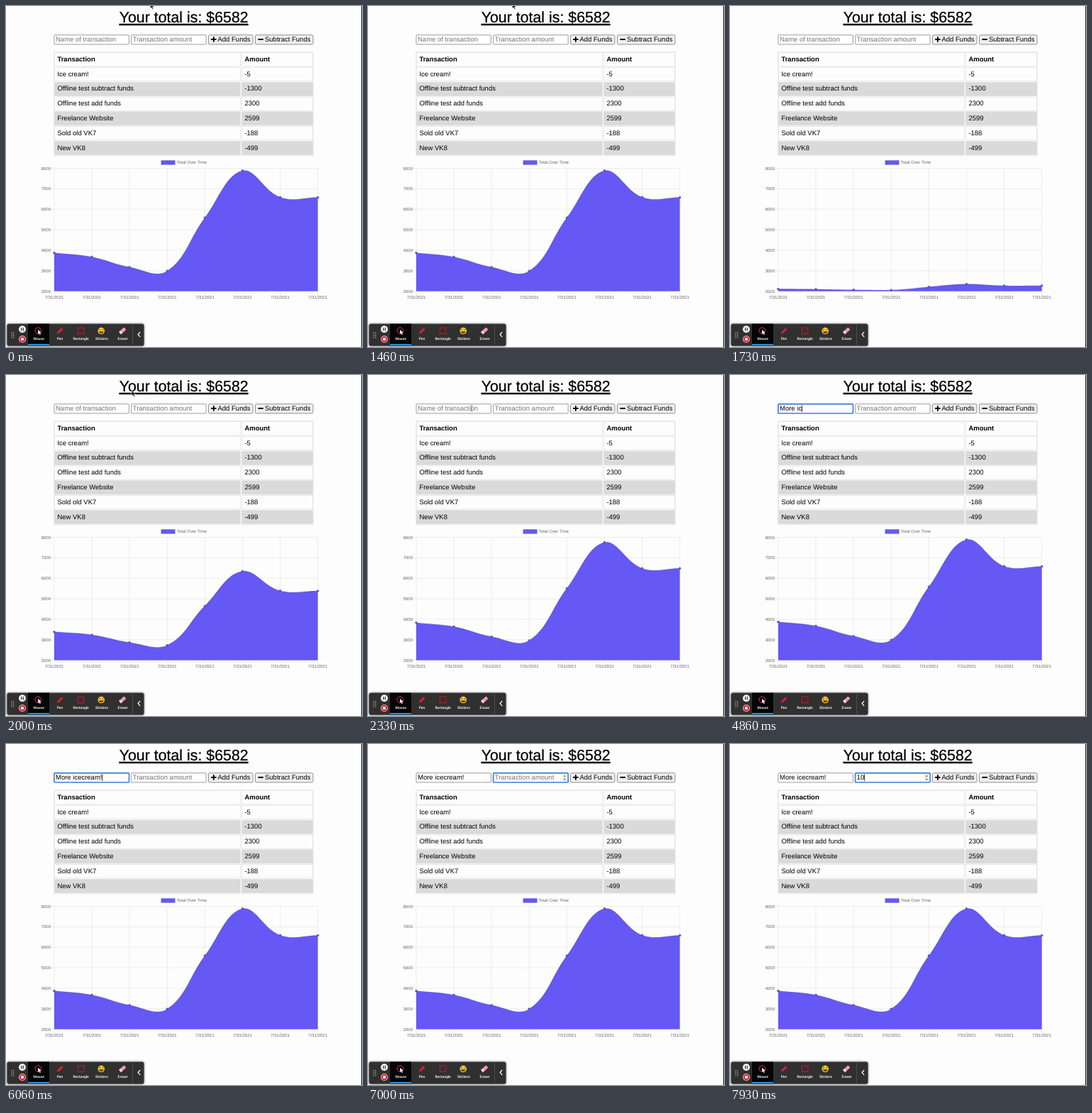
These frames come from a looping animation (502 px wide and 480 px high, 8000 ms). An HTML page:

```html
<!DOCTYPE html>
<html lang="en">
<head>
<meta charset="utf-8">
<title>Budget tracker</title>
<style>
  html, body { margin: 0; width: 100%; height: 100%; overflow: hidden; background: #fdfdfd; }
  svg { display: block; width: 502px; height: 480px; }
  text {
    font: 9.5px "Liberation Sans", Arial, sans-serif; fill: #000;
    white-space: pre; text-rendering: geometricPrecision;
  }
  .title { font-size: 21.35px; text-anchor: middle; text-decoration: underline; stroke: #000; stroke-width: 0.25px; }
  .bold { font-weight: bold; }
  .axis { font-size: 6px; fill: #666; }
  .mid { text-anchor: middle; }
  .end { text-anchor: end; }
  .hint { fill: #757575; }
  .tool { font: 500 5px Roboto, sans-serif; fill: #fff; text-anchor: middle; }
  .panel { filter: drop-shadow(0 0 1.5px rgba(0, 0, 0, 0.7)); }
</style>
</head>
<body>
<svg id="stage" viewBox="0 0 502 480"></svg>
<script>
const LOOP = 8000;
const stage = document.getElementById('stage');

function add(tag, attrs, parent = stage) {
  const el = document.createElementNS('http://www.w3.org/2000/svg', tag);
  for (const key in attrs) el.setAttribute(key, attrs[key]);
  parent.appendChild(el);
  return el;
}
const rect = (x, y, width, height, fill, more = {}, parent) =>
  add('rect', { x, y, width, height, fill, ...more }, parent);
const path = (d, more = {}, parent) => add('path', { d, fill: 'none', ...more }, parent);
function label(text, x, y, cls = '', parent) {
  const el = add('text', { x, y, class: cls }, parent);
  el.textContent = text;
  return el;
}
const show = (el, on) => el.setAttribute('visibility', on ? 'visible' : 'hidden');

// Heading
label('Your total is: $6582', 250.7, 23, 'title');
rect(501, 0, 1, 480, '#222');

// Form
const FORM_Y = 40.8, FORM_BASE = 50.3;
function makeField(x, hint) {
  const box = rect(x, FORM_Y, 105.5, 13.2, '#fff', { rx: 1 });
  const text = label('', x + 2, FORM_BASE);
  const caret = rect(0, 42.5, 0.8, 9.6, '#000');
  return (value, focused, caretOn) => {
    box.setAttribute('stroke', focused ? '#3f7fdc' : '#858585');
    box.setAttribute('stroke-width', focused ? 1.7 : 0.8);
    text.textContent = value || hint;
    text.setAttribute('class', value ? '' : 'hint');
    show(caret, focused && caretOn);
    caret.setAttribute('x', x + 2 + (value ? text.getComputedTextLength() : 0));
  };
}
const nameField = makeField(68, 'Name of transaction');
const amountField = makeField(176.7, 'Transaction amount');

const spinner = add('g', {});
rect(274.8, 42.4, 5, 10, '#ededed', { rx: 2 }, spinner);
path('M275.9 46.1l1.4-1.7 1.4 1.7M275.9 48.8l1.4 1.7 1.4-1.7', { stroke: '#444', 'stroke-width': 0.9 }, spinner);

function button(x, width, text, textX, icon) {
  rect(x, FORM_Y, width, 13.2, '#efefef', { rx: 1.8, stroke: '#777', 'stroke-width': 0.8 });
  path(icon, { stroke: '#000', 'stroke-width': 1.8, 'stroke-linecap': 'round' });
  label(text, textX, FORM_BASE);
}
button(285.5, 62.5, 'Add Funds', 298.5, 'M289.9 47h6M292.9 44v6');
button(351.5, 81.5, 'Subtract Funds', 365, 'M356.2 47h6');

// Table
const rows = [
  ['Transaction', 'Amount'],
  ['Ice cream!', '-5'],
  ['Offline test subtract funds', '-1300'],
  ['Offline test add funds', '2300'],
  ['Freelance Website', '2599'],
  ['Sold old VK7', '-188'],
  ['New VK8', '-499']
];
path('M67.5 211V64.8H433.5V211', { stroke: '#e4e4e4', 'stroke-width': 0.7 });
rows.forEach((cells, i) => {
  const y = 65.7 + i * 20.78;
  const shaded = i > 0 && i % 2 === 0;
  [[68.3, 262.4], [332.3, 100.4]].forEach(([x, width], col) => {
    rect(x, y, width, 19.2, shaded ? '#dadada' : '#fdfdfd', { stroke: '#dadada', 'stroke-width': 0.6 });
    label(cells[col], x + 4.1, y + 12.2, i ? '' : 'bold');
  });
});
rect(67.5, 210.6, 366, 0.7, '#e4e4e4');

// Chart
const LEFT = 68, TOP = 228.5, BASE = 401.5, STEP_X = 53.1, STEP_Y = (BASE - TOP) / 6;
const RIGHT = LEFT + 7 * STEP_X;
const soft = { stroke: '#000', 'stroke-opacity': 0.1, 'stroke-width': 1.5 };
const chart = add('g', {});
rect(218.8, 217.4, 19.6, 6, '#6558f5', soft, chart);
label('Total Over Time', 241, 222.4, 'axis', chart);
const totals = [3874, 3675, 3176, 2988, 5587, 7887, 6587, 6582];
const grid = { stroke: '#e5e5e5', 'stroke-width': 0.7 };
for (let i = 0; i <= 6; i++) {
  const y = TOP + i * STEP_Y;
  path(`M63 ${y}H${RIGHT}`, grid, chart);
  label(8000 - i * 1000, 63, y + 2.1, 'axis end', chart);
}
totals.forEach((_, i) => {
  const x = LEFT + i * STEP_X;
  path(`M${x} ${TOP}V407`, grid, chart);
  label('7/31/2021', x, 412, 'axis mid', chart);
});
const area = path('', { fill: '#6558f5' }, chart);
const line = path('', soft, chart);

const points = totals.map((v, i) => ({ x: LEFT + i * STEP_X, y: BASE - (v - 2000) / 1000 * STEP_Y }));
const dots = points.map(p => add('circle', { cx: p.x, r: 1.7, fill: '#5b50dd' }, chart));

// Spline handles with tension 0.4, weighted by the distance to each neighbour
const handles = points.map((p, i) => {
  const a = points[i - 1] || p, b = points[i + 1] || p;
  const before = Math.hypot(p.x - a.x, p.y - a.y);
  const after = Math.hypot(b.x - p.x, b.y - p.y);
  const at = f => ({
    x: p.x + f * (b.x - a.x),
    y: Math.min(BASE, Math.max(TOP, p.y + f * (b.y - a.y)))
  });
  return { into: at(-0.4 * before / (before + after)), out: at(0.4 * after / (before + after)) };
});

function drawChart(grow) {
  const put = p => `${p.x.toFixed(2)} ${(BASE + (p.y - BASE) * grow).toFixed(2)}`;
  let d = 'M' + put(points[0]);
  for (let i = 1; i < points.length; i++) {
    d += `C${put(handles[i - 1].out)} ${put(handles[i].into)} ${put(points[i])}`;
  }
  line.setAttribute('d', d);
  area.setAttribute('d', `${d}V${BASE}H${LEFT}Z`);
  dots.forEach((dot, i) => dot.setAttribute('cy', BASE + (points[i].y - BASE) * grow));
}

// Recorder toolbar
rect(1.5, 447.4, 193, 31, '#303030', { rx: 2.5, class: 'panel' });
rect(31, 447.4, 30, 31, '#050505');
rect(31, 475.8, 30, 2, '#2b9cf2');
rect(178, 447.4, 0.8, 31, '#555');
for (let i = 0; i < 8; i++) rect(7.4 + (i % 2) * 2.7, 459 + (i >> 1) * 2.4, 1.2, 1.2, '#bbb');
add('circle', { cx: 23, cy: 455, r: 5, fill: '#f2f2f2' });
path('M21.7 452.8v4.4M24.3 452.8v4.4', { stroke: '#333', 'stroke-width': 1.2 });
add('circle', { cx: 23, cy: 469, r: 5, fill: '#f3c9ce' });
add('circle', { cx: 23, cy: 469, r: 4.2, fill: '#d9243c' });
rect(21.2, 467.2, 3.6, 3.6, '#fff');

const ARROW = 'M0 0V7.6L1.8 6 3 8.7 4.3 8.1 3.1 5.5H5.5Z';
add('circle', { cx: 45.3, cy: 457, r: 4.3, fill: 'none', stroke: '#e0384b', 'stroke-width': 1 });
path(ARROW, { fill: '#fff', transform: 'translate(45.2 455.5) scale(.85)' });
path('M72 461.5l1-3.2 5.4-5.4 2.2 2.2-5.4 5.4Z', { fill: '#d91f37' });
rect(101.5, 453, 8.4, 8.4, 'none', { stroke: '#c9152c', 'stroke-width': 1.1 });
add('circle', { cx: 134.3, cy: 457.3, r: 4.8, fill: '#f8c62f' });
path('M131.3 458h6a3 3 0 0 1-6 0Z', { fill: '#7a3a13' });
path('M131 456l2-.8M135.6 455.2l2 .8', { stroke: '#5d3512', 'stroke-width': 0.9 });
path('M129.6 457l1.5.5-1 2ZM139 457l-1.5.5 1 2Z', { fill: '#55aeea' });
rect(159.3, 454.9, 10, 4.6, '#ee9aa9', { rx: 1, transform: 'rotate(-42 164.3 457.2)' });
rect(159.3, 454.9, 3.2, 4.6, '#f7cdd3', { rx: 1, transform: 'rotate(-42 164.3 457.2)' });
[['Mouse', 46.2], ['Pen', 76], ['Rectangle', 105.6], ['Stickers', 135], ['Eraser', 164.7]]
  .forEach(([text, x], i) => label(text, x, 470.2, i ? 'tool' : 'tool bold'));
path('M189.2 458.8l-3 3.5 3 3.5', { stroke: '#fff', 'stroke-width': 1.3 });

// Pointers
const arrow = path(ARROW, { fill: '#000', stroke: '#fff', 'stroke-width': 0.6 });
const beam = path('M-1.5-4.2Q0-4.2 0-3.2 0-4.2 1.5-4.2M0-3.2V3.2M-1.5 4.2Q0 4.2 0 3.2 0 4.2 1.5 4.2',
  { stroke: '#555', 'stroke-width': 0.7 });

// Pointer stops: time, x, y
const track = [
  [0, 203.5, -4], [1480, 203.5, -4], [1560, 203.5, -12], [1880, 196, -10],
  [1930, 188, 13], [2130, 158, 38], [2300, 146, 47], [2860, 146, 47], [3300, 146, 45], [LOOP, 146, 45]
];
function pointerAt(t) {
  const i = track.findIndex(stop => stop[0] > t);
  const [t0, x0, y0] = track[i - 1], [t1, x1, y1] = track[i];
  const p = (t - t0) / (t1 - t0);
  return [x0 + (x1 - x0) * p, y0 + (y1 - y0) * p];
}

const RELOAD = 1640, GROW = 1716, CLICK = 3400, TYPE = 3950, TAB = 6500, DIGITS = 7350;
const typed = (text, t, start, pace) =>
  text.slice(0, Math.max(0, Math.floor((t - start) / pace) + 1));
const blink = (t, start) => (t - start) % 1000 < 500;

function render(t) {
  const p = Math.min(1, Math.max(0, (t - GROW) / 1000));
  show(chart, t < RELOAD || t >= GROW);
  drawChart(t < RELOAD ? 1 : 1 - (1 - p) ** 4);

  const name = typed('More icecream!', t, TYPE, 140);
  const amount = typed('10', t, DIGITS, 250);
  const nameCaret = name ? t < TYPE + 1820 || blink(t, TYPE + 1820) : t < CLICK + 220;
  nameField(name, t >= CLICK && t < TAB, nameCaret);
  amountField(amount, t >= TAB, amount ? true : blink(t, TAB));
  show(spinner, t >= TAB);

  const [x, y] = pointerAt(t);
  const overField = y > 41;
  show(arrow, !overField);
  show(beam, overField && t < TYPE);
  for (const el of [arrow, beam]) el.setAttribute('transform', `translate(${x} ${y})`);
}

const start = performance.now();
function tick() {
  render((performance.now() - start) % LOOP);
  requestAnimationFrame(tick);
}
tick();
</script>
</body>
</html>
```
